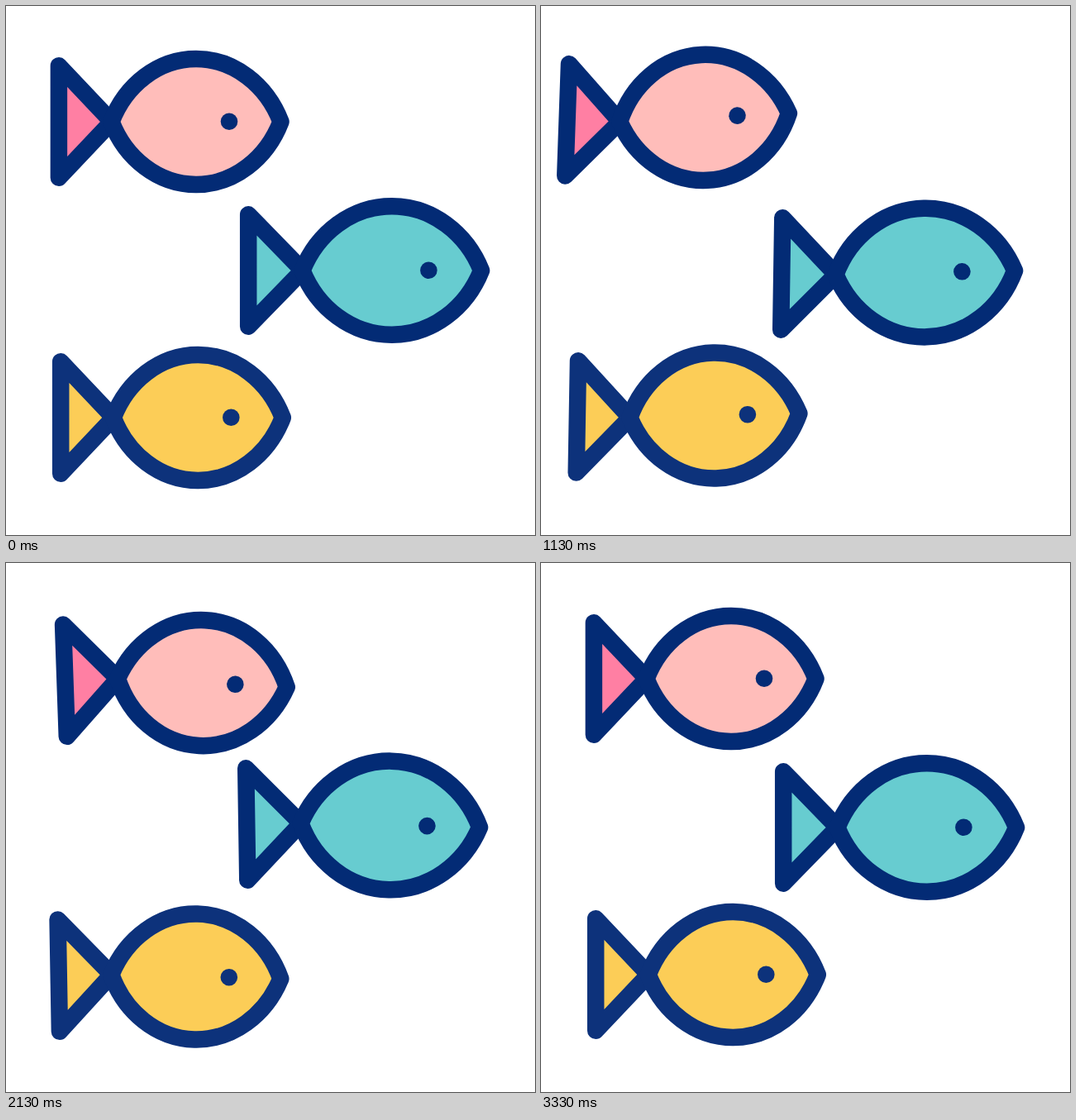
Recreate the animation shown at these times as an HTML page. Size 640 by 640 pixels, loop 3.7 s.

```html
<!DOCTYPE html>
<html lang="en">
<head>
<meta charset="utf-8">
<title>Three fish</title>
<style>
  html, body { margin: 0; width: 100%; height: 100%; overflow: hidden; background: #fff; }
  svg { display: block; width: 100%; height: 100%; }
</style>
</head>
<body>
<svg viewBox="0 0 640 640" stroke-width="20.5" stroke-linejoin="round"></svg>
<script>
const LOOP = 3700, FPS = 30, LAST = 100, HALF = 6;
const svg = document.querySelector('svg');

// x, y: joint of tail and body; pivot: turning point relative to the joint.
// move and turn: [first peak, last peak, end, lead-in value, high, low]
const school = [
  { x: 127.5, y: 140, tail: 63.6, half: 102.5, rise: 76, eye: 40, pivot: 0,
    ink: '#032b75', fill: '#ffbdba', tailFill: '#ff7fa3',
    move: [16, 88, 100, -18, 7.5, -32.3], turn: [16, 88, 100, 0, 2.85, -2.85] },
  { x: 358.5, y: 320, tail: 65.3, half: 108.3, rise: 77.8, eye: 44.6, pivot: 227,
    ink: '#032b75', fill: '#67ccd0', tailFill: '#67ccd0',
    move: [19, 91, 96, -16, 12, -16], turn: [18, 90, 96, 0, 2.5, -2.5] },
  { x: 129.8, y: 498, tail: 63.6, half: 102.5, rise: 76, eye: 40, pivot: 0,
    ink: '#0d327b', fill: '#fccd57', tailFill: '#fccd57',
    move: [14, 86, 100, -18, 7.5, -32.3], turn: [14, 86, 100, 0, 2.8, -2.8] }
];

function add(parent, tag, attrs) {
  const el = document.createElementNS('http://www.w3.org/2000/svg', tag);
  for (const key in attrs) el.setAttribute(key, attrs[key]);
  return parent.appendChild(el);
}

function bodyPath({ half: a, rise: h }) {
  const side = s => {
    const top = -s * h, steep = -s * h * 0.58, near = a * 0.165, flat = a * 0.45;
    return s > 0
      ? `C${near} ${steep} ${a - flat} ${top} ${a} ${top}S${2 * a - near} ${steep} ${2 * a} 0`
      : `C${2 * a - near} ${steep} ${a + flat} ${top} ${a} ${top}S${near} ${steep} 0 0`;
  };
  return `M0 0${side(1)}${side(-1)}Z`;
}

for (const fish of school) {
  fish.group = add(svg, 'g', { stroke: fish.ink });
  fish.fin = add(fish.group, 'path', {
    d: `M${-fish.tail} -67.7V67.7L0.5 0Z`, fill: fish.tailFill
  });
  add(fish.group, 'path', { d: bodyPath(fish), fill: fish.fill });
  add(fish.group, 'circle', {
    cx: fish.half + fish.eye, cy: -0.3, r: 10.3, fill: fish.ink, stroke: 'none'
  });
}

// Cosine blend; beyond u = 1 it swings back and forth.
const mix = (a, b, u) => a + (b - a) * (1 - Math.cos(Math.PI * u)) / 2;

function swing(f, [first, last, end, lead, high, low]) {
  const start = first - HALF;
  if (f < start) return mix(0, lead, f / start);
  if (f < first) return mix(lead, high, (f - start) / HALF);
  if (f <= last) return mix(high, low, (f - first) / HALF);
  return f < end ? mix(high, 0, (f - last) / (end - last)) : 0;
}

function draw() {
  const t = performance.now() % LOOP;
  const f = Math.min(LAST, Math.floor(t * FPS / 1000 + 0.15));
  for (const fish of school) {
    const angle = swing(f, fish.turn);
    fish.group.setAttribute('transform',
      `translate(${fish.x + swing(f, fish.move)} ${fish.y}) rotate(${angle} ${fish.pivot} 0)`);
    // The tail beats against the body.
    fish.fin.setAttribute('transform', `rotate(${-1.7 * angle})`);
  }
  requestAnimationFrame(draw);
}
draw();
</script>
</body>
</html>
```
